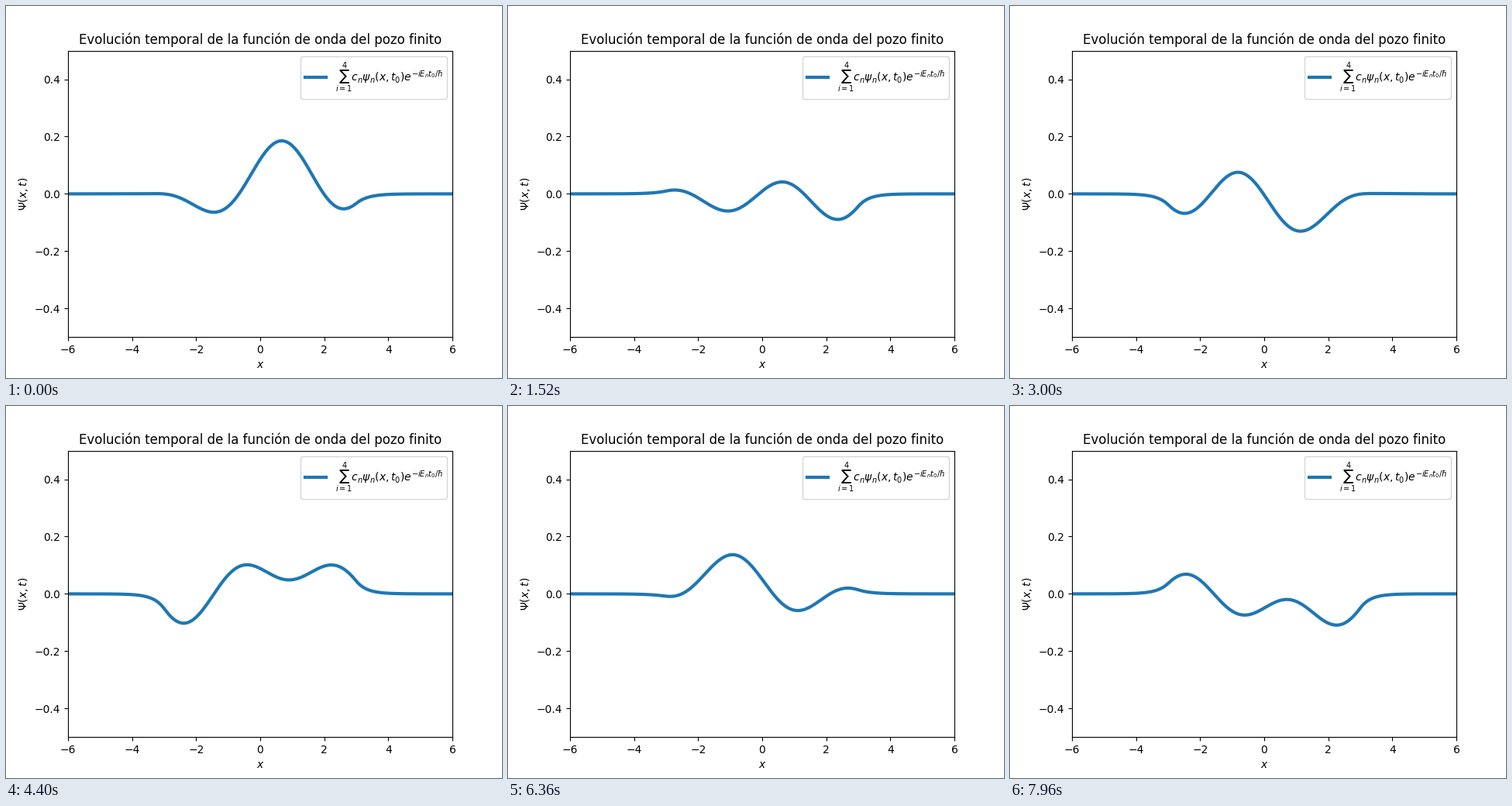
These frames come from a looping animation (640 px wide and 480 px high, 8000 ms). A matplotlib script:

```python
import numpy as np
import matplotlib.pyplot as plt
from matplotlib.animation import FuncAnimation

FRAMES = 200
INTERVAL = 40

# Finite square well, hbar = m = 1
HALF = 3.0045
DEPTH = 6.0
K0 = np.sqrt(2 * DEPTH)

x = np.linspace(-6, 6, 1000)
dx = x[1] - x[0]


def wave_number(n):
    """Solve k*a = n*pi/2 - arcsin(k/k0) by fixed-point iteration."""
    k = 0.0
    for _ in range(60):
        k = (n * np.pi / 2 - np.arcsin(k / K0)) / HALF
    return k


def bound_state(n):
    """Return the state on the grid (unit vector norm) and its energy."""
    k = wave_number(n)
    kappa = np.sqrt(K0**2 - k**2)
    wave = np.cos if n % 2 else np.sin
    inside = wave(k * np.clip(x, -HALF, HALF))
    tail = np.exp(-kappa * np.maximum(np.abs(x) - HALF, 0))
    norm = np.sqrt(dx / (HALF + 1 / kappa))
    return norm * inside * tail, k**2 / 2


states, energies = map(np.array, zip(*(bound_state(n) for n in range(1, 5))))


def psi(t):
    return np.cos(energies * t) @ states


fig, ax = plt.subplots(figsize=(6.4, 4.8), dpi=100)
line, = ax.plot(x, psi(0), lw=3,
                label=r"$\sum_{i=1}^4 c_n\psi_n(x,t_0)e^{-iE_nt_0/\hbar}$")
ax.set_xlim(-6, 6)
ax.set_ylim(-0.5, 0.5)
ax.set_title("Evolución temporal de la función de onda del pozo finito")
ax.set_xlabel("$x$")
ax.set_ylabel(r"$\Psi(x,t)$")
ax.legend(loc="upper right")


def update(i):
    line.set_ydata(psi(i))
    return line,


anim = FuncAnimation(fig, update, frames=FRAMES, interval=INTERVAL,
                     repeat=True, repeat_delay=0)
plt.show()
```
